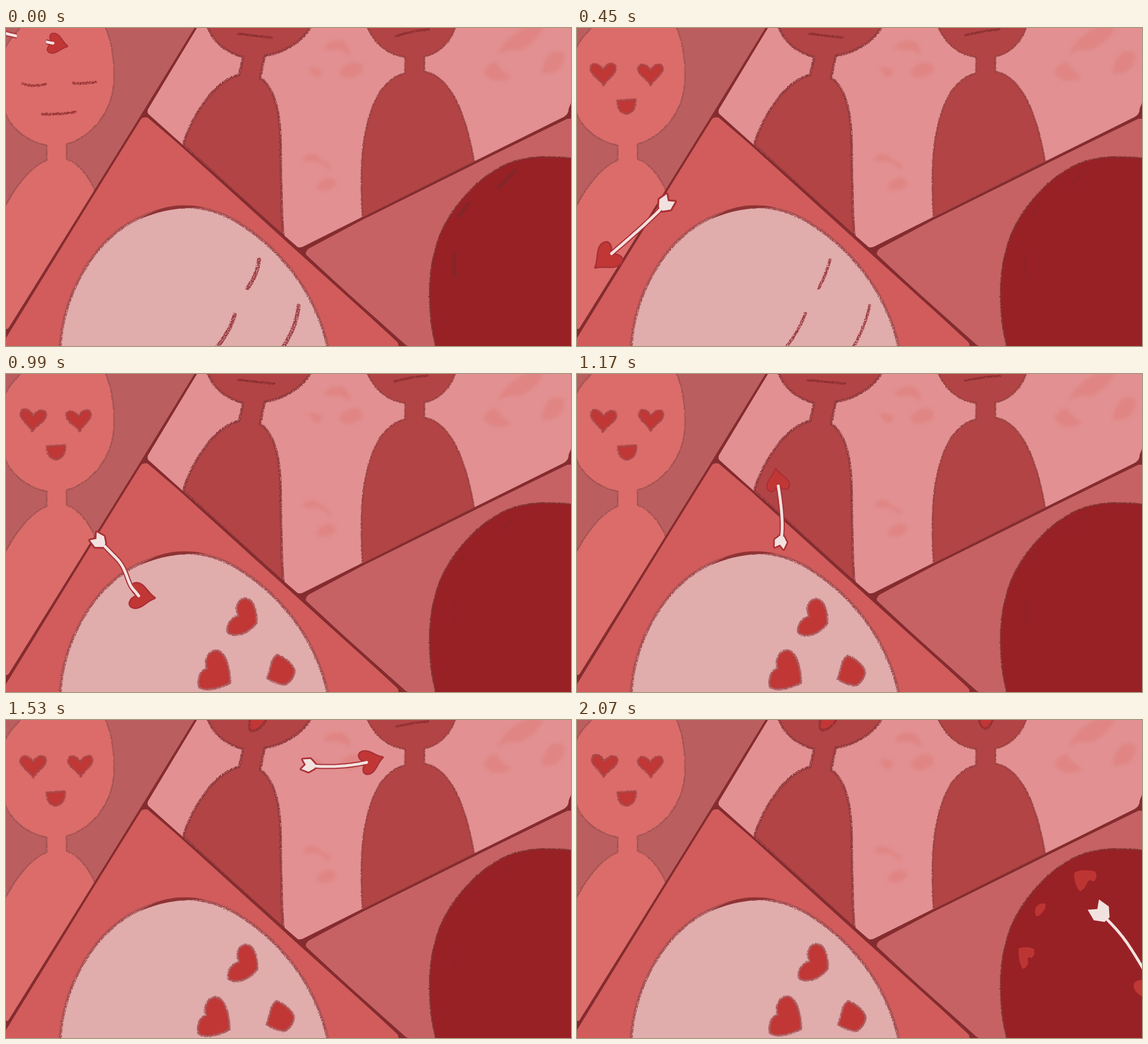
Recreate the animation shown at these times as an HTML page. Size 998 by 561 pixels, loop 2.16 s.

```html
<!DOCTYPE html>
<html lang="en">
<head>
<meta charset="utf-8">
<title>Arrow through the panels</title>
<style>
  html, body { margin: 0; width: 100%; height: 100%; overflow: hidden; background: #842c2f; }
  svg { display: block; width: 100vw; height: 100vh; }
  .line { fill: none; stroke-linecap: round; stroke-linejoin: round; }
  .red { fill: #c03735; }
</style>
</head>
<body>
<svg viewBox="0 0 998 561" preserveAspectRatio="none">
  <defs>
    <filter id="pencil" filterUnits="userSpaceOnUse" x="0" y="0" width="998" height="561" color-interpolation-filters="sRGB">
      <feTurbulence type="fractalNoise" baseFrequency=".45" numOctaves="2" seed="4" result="noise"/>
      <feDisplacementMap in="SourceGraphic" in2="noise" scale="3" xChannelSelector="R" yChannelSelector="G" result="rough"/>
      <feColorMatrix in="noise" values="0 0 0 0 0  0 0 0 0 0  0 0 0 0 0  4 0 0 0 -1.1" result="grain"/>
      <feComposite in="rough" in2="grain" operator="in"/>
    </filter>
    <filter id="soft"><feGaussianBlur stdDeviation="3"/></filter>
    <path id="leftPanel" d="M0 0H333L10 524Q6 531 0 531Z"/>
    <clipPath id="leftClip"><use href="#leftPanel"/></clipPath>
    <!-- the arrow is out of sight inside these two holes -->
    <clipPath id="pierce">
      <path clip-rule="evenodd" d="M0 0H998V561H0ZM19 0H71V62H19ZM840 262L866 250L930 290L893 307V345H850Z"/>
    </clipPath>
    <path id="girl" d="M72 207V233C45 245 20 275 0 312L-9 330V570H160L157 286C145 260 130 240 107 231V205C150 192 191 150 191 85C191 50 186 22 176 0L170 -9H32L25 0C12 14 4 24 0 33L-9 50V135L0 153C12 180 40 201 72 207Z"/>
    <path id="tall" d="M357 0C368 28 392 44 419 51L412 83C372 91 330 150 313 206L490 368C486 330 486 260 485 200C484 150 475 105 449 88L457 49C490 44 522 25 537 0L541 -9H354Z"/>
    <path id="wide" d="M639 0C652 28 675 48 705 51V80C642 95 628 195 628 270C628 300 629 320 630 335L827 236C815 165 790 85 739 77V50C765 46 787 22 793 0L795 -9H636Z"/>
    <path id="pale" d="M95 570L96 561C102 470 153 374 235 335C300 305 355 312 405 340C480 385 545 460 568 561V570Z"/>
    <path id="dark" d="M1007 231L998 230C950 225 905 226 868 249C820 276 772 335 758 392C745 440 745 500 759 561L761 570H1007Z"/>
  </defs>

  <rect width="998" height="561" fill="#842c2f"/>
  <use href="#leftPanel" fill="#bb5e5f"/>
  <path fill="#e29092" d="M337 0L251 143Q248 150 254 154L312 206L490 366L508 383Q515 389 524 386L630 333L985 157Q994 152 994 142L998 132V0Z"/>
  <path fill="#d15c5b" d="M0 547L236 163Q243 154 256 160L312 211L480 363L690 552Q694 557 693 561H0Z"/>
  <path fill="#c66264" d="M998 160L990 160L830 239L632 337L535 389Q526 396 532 404L706 559L710 561H998Z"/>

  <g fill="#e08583" filter="url(#soft)">
    <path d="M560 36Q570 20 592 22Q608 28 608 50Q598 40 588 38Q572 40 560 36Z"/>
    <path d="M534 70Q545 66 560 76Q556 88 545 86Z"/>
    <path d="M588 80Q594 66 612 60Q632 60 630 76Q616 90 600 88Z"/>
    <path d="M524 232Q532 218 548 224Q556 232 574 242Q576 250 568 248Q558 236 544 234Q534 240 524 232Z"/>
    <path d="M548 284Q552 264 574 264Q588 270 580 280Q566 292 548 284Z"/>
    <path d="M868 48Q878 24 902 8Q925 -10 950 0Q940 20 918 34Q906 42 890 38Q876 42 868 48Z"/>
    <path d="M843 80Q848 62 866 60Q874 76 892 86Q880 96 858 92Z"/>
    <path d="M946 82Q948 58 962 44Q980 36 987 48Q986 68 970 78Z"/>
  </g>

  <g clip-path="url(#leftClip)">
    <use href="#girl" fill="#db6c6a"/>
    <use href="#girl" class="line" stroke="#9d5150" stroke-width="2.6" filter="url(#pencil)"/>
  </g>
  <g fill="#b24445">
    <use href="#tall"/>
    <use href="#wide"/>
  </g>
  <use href="#pale" fill="#e1acac"/>
  <use href="#dark" fill="#982126"/>
  <g class="line" filter="url(#pencil)">
    <use href="#tall" stroke="#8e393c" stroke-width="4.4"/>
    <use href="#wide" stroke="#97403f" stroke-width="3"/>
    <use href="#pale" stroke="#a04d50" stroke-width="5"/>
    <use href="#dark" stroke="#80302f" stroke-width="3"/>
  </g>
  <path d="M235 338C265 318 300 306 352 317C315 316 275 320 235 338Z" fill="#8f3335"/>
  <path class="line" stroke="#842c2f" stroke-width="3.6"
    d="M335 0L245.500 146L0 540M246 152L312 208.500L490 367L520 393L699 559M520 393L631 335.500L828 237.500L998 155"/>

  <g id="fills"></g>
  <g id="ink" filter="url(#pencil)"></g>
  <g id="arrow" clip-path="url(#pierce)"></g>
</svg>

<script>
const STEP = 90, COUNT = 24;
const HEART = 'M0 0C-12 -5 -20 -21 -32 -21C-44 -21 -44 -8 -29 0C-44 8 -44 21 -32 21C-20 21 -12 5 0 0Z';
const FEATHER = 'M7 0L0 -9L14 -12L24 -4V4L14 12L0 9Z';

// Where the tip stands at each step; two extra points lead in.
const tips = [
  [-110, -20], [5, 11],
  [108, 32], [205, 55], [260, 120], [215, 195], [168, 297], [33, 422],
  [-40, 480], [0, 320], [112, 268], [195, 325], [225, 380], [262, 395],
  [356, 310], [351, 168], [325, 80], [430, 15], [523, 78], [665, 66],
  [735, -15], [800, 85], [838, 212], [902, 313], [970, 391], [1037, 503]
];
// step, arrow length, arrow scale
const sizes = [[0, 190, .8], [5, 180, 1.1], [8, 200, 1.2], [13, 140, .9], [17, 143, .95], [21, 116, .95], [23, 218, 1.5]];

const fills = document.getElementById('fills');
const ink = document.getElementById('ink');
const arrow = document.getElementById('arrow');

function wobble(n, k, amount) {
  const v = Math.sin(n * 12.9 + k * 78.2) * 43758.5;
  return (v - Math.floor(v) - .5) * 2 * amount;
}

function spline(u) {
  const i = Math.floor(u), f = u - i;
  const p = k => tips[Math.min(tips.length - 1, Math.max(0, i + k))];
  const [a, b, c, d] = [p(-1), p(0), p(1), p(2)];
  return [0, 1].map(k => b[k] + .5 * f * (c[k] - a[k] +
    f * (2 * a[k] - 5 * b[k] + 4 * c[k] - d[k] + f * (3 * (b[k] - c[k]) + d[k] - a[k]))));
}

function sizeAt(n) {
  const i = Math.max(1, sizes.findIndex(s => s[0] >= n));
  const a = sizes[i - 1], b = sizes[i], f = (n - a[0]) / (b[0] - a[0]);
  return [1, 2].map(k => a[k] + (b[k] - a[k]) * f);
}

const place = (x, y, deg, sx, sy = sx) => `transform="translate(${x} ${y}) rotate(${deg}) scale(${sx} ${sy})"`;
const angle = (a, b) => Math.atan2(b[1] - a[1], b[0] - a[0]) * 180 / Math.PI;
const line = (d, color, width) => `<path class="line" d="${d}" stroke="${color}" stroke-width="${width}"/>`;

function drawFaces(n) {
  const w = (k, amount) => wobble(n, k, amount);
  let solid = '', drawn = '';

  // a clean red fill under a grainy outline
  function shape(d, edge, spot) {
    solid += `<path class="red" d="${d}" ${spot}/>`;
    drawn += `<path class="line" d="${d}" ${spot} stroke="${edge}" stroke-width="4"/>`;
  }
  const blob = (d, edge, k) => shape(d, edge, place(w(k, 1), w(k + 1, 1), 0, 1));

  if (n < 2) {
    drawn += line('M29 98Q48 105 70 99M119 97Q142 99 159 95M64 152Q96 153 123 148', '#973335', 4.4);
  } else {
    const edge = '#a84546';
    shape(HEART, edge, place(47 + w(1, 1.5), 101 + w(2, 1), 90 + w(3, 4), .93, 1.06));
    shape(HEART, edge, place(131 + w(4, 1.5), 101 + w(5, 1), 88 + w(6, 4), .9, 1.02));
    blob('M72 128L104 126Q105 149 88 151Q73 150 72 128Z', edge, 7);
  }

  if (n < 11) {
    const bend = n ? 0 : 4;
    drawn += line(`M447 ${409 + w(1, 2)}Q${441 + bend} 434 ${427 + w(2, 4)} ${460 + w(3, 4)}` +
      `M404 ${504 + w(4, 3)}Q${393 + bend} 533 ${370 + w(5, 3)} 563` +
      `M517 ${489 + w(6, 2)}Q${509 + bend} 528 ${490 + w(7, 3)} 564`, '#9b3b40', n ? 5 : 7);
  } else {
    const edge = '#a9595c';
    blob('M443 439C444 415 436 396 423 396C409 397 405 412 411 427C400 428 389 442 392 455C398 464 425 463 443 439Z', edge, 1);
    blob('M395 545C395 515 385 488 370 488C354 489 349 508 354 520C343 522 336 540 341 553C352 560 375 556 395 545Z', edge, 3);
    blob('M479 496C495 502 508 515 510 525C507 538 500 548 490 549C478 546 468 542 461 537C468 525 466 505 479 496Z', edge, 5);
  }

  if (n < 15) drawn += line(`M${411 + w(1, 3)} ${10 + w(2, 1)}Q440 14 ${471 + w(3, 4)} 17`, '#8a2d30', 4);
  else blob('M431 -4Q426 14 432 19Q444 20 456 4L461 -4Z', '#8e2f31', 1);

  if (n < 19) drawn += line(`M${687 + w(4, 3)} ${13 + w(5, 1.5)}Q716 5 ${746 + w(6, 2)} ${3 + w(7, 1)}`, '#8a2d30', 4);
  else blob('M708 -4Q712 15 721 16Q730 12 735 -4Z', '#8e2f31', 3);

  if (n < 22) {
    drawn += `<g opacity="${n ? .42 - n * .012 : .7}">` +
      line('M871 280Q884 268 899 251M800 332L817 310M792 398Q790 420 793 437', '#782a2b', n ? 4 : 7) + '</g>';
  } else {
    solid += '<path fill="#bd3533" d="M878 270Q890 262 915 267Q921 278 912 285Q904 278 900 290Q895 300 888 302Q878 290 878 270Z' +
      'M811 330Q817 322 827 324Q829 332 823 338Q817 347 811 346Q807 338 811 330Z' +
      'M780 403Q795 398 807 404Q810 416 802 420Q794 414 797 428Q794 438 787 439Q779 425 780 403Z"/>';
  }
  fills.innerHTML = solid;
  ink.innerHTML = drawn;
}

function drawArrow(n) {
  const [length, scale] = sizeAt(n);
  const pts = [spline(n + 2)], neck = [];
  let run = 0;
  for (let u = n + 2; run < length && u > .04;) {
    const last = pts[pts.length - 1], p = spline(u -= .025);
    run += Math.hypot(p[0] - last[0], p[1] - last[1]);
    pts.push(p);
    if (run > 30 * scale && run < length - 16 * scale) neck.push(p);
  }
  const tip = pts[0], tail = pts[pts.length - 1];
  const back = neck[0] || tail, front = neck[neck.length - 1] || tip;
  const shaft = 'M' + neck.map(p => p.map(v => v.toFixed(1)).join(' ')).join('L');
  const head = place(tip[0], tip[1], angle(back, tip), scale);
  const feather = place(tail[0], tail[1], angle(tail, front), scale);
  const edge = n < 22 ? '#a93036' : 'none';
  arrow.innerHTML =
    `<g fill="none" stroke="${edge}" stroke-linejoin="round">` +
    `<path d="${shaft}" stroke-width="9"/>` +
    `<path d="${FEATHER}" ${feather} stroke-width="6"/><path d="${HEART}" ${head} stroke-width="5"/></g>` +
    `<path class="red" d="${HEART}" ${head}/>` +
    line(shaft, '#f2e2df', 5) +
    `<path d="${FEATHER}" ${feather} fill="#f2e2df"/>`;
}

const start = performance.now();
let shown = -1;
function tick() {
  const n = Math.floor((performance.now() - start) / STEP) % COUNT;
  if (n !== shown) {
    shown = n;
    drawFaces(n);
    drawArrow(n);
  }
  requestAnimationFrame(tick);
}
tick();
</script>
</body>
</html>
```
